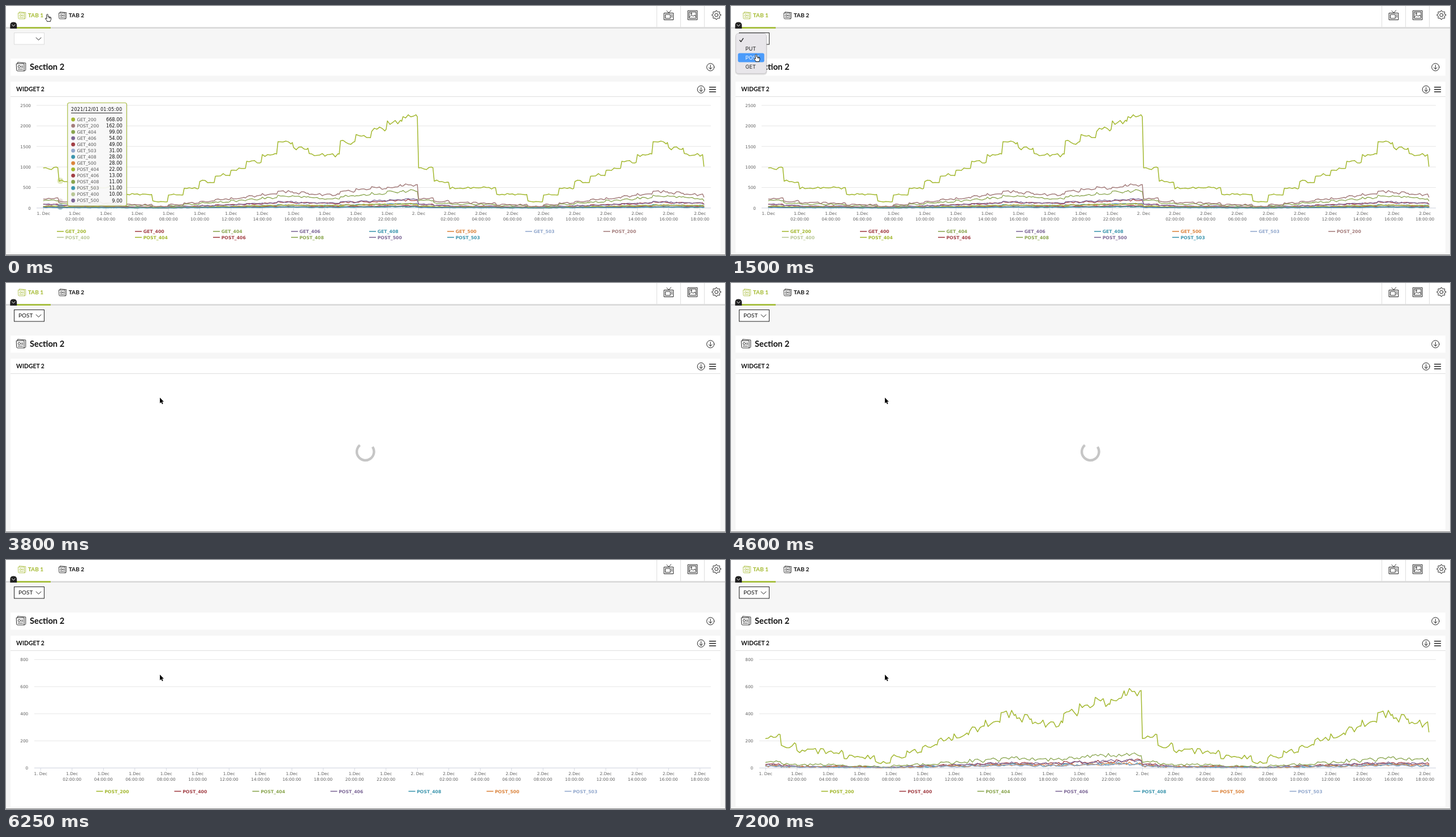
Recreate the animation shown at these times as an HTML page. Size 1271 by 441 pixels, loop 7.3 s.

```html
<!DOCTYPE html>
<html lang="en">
<head>
<meta charset="utf-8">
<title>Dashboard filter</title>
<style>
html, body { margin: 0; width: 100%; height: 100%; overflow: hidden; background: #f6f6f6; }
svg { display: block; width: 1271px; height: 441px; }
text { font-family: Lato, "Open Sans", sans-serif; fill: #111; }
.b { font-weight: 700; }
.axis { font: 7.35px "DejaVu Sans", sans-serif; fill: #606060; }
.key { font: bold 7.75px "DejaVu Sans", sans-serif; }
.tip { font: 7.7px "DejaVu Sans", sans-serif; fill: #555; }
.val { font: 8.2px "DejaVu Sans", sans-serif; fill: #111; }
.item { font: 9.2px Inter, sans-serif; }
.ln { fill: none; stroke: #222; stroke-width: 1; stroke-linecap: round; stroke-linejoin: round; }
</style>
</head>
<body>
<svg id="stage" viewBox="0 0 1271 441"></svg>
<script>
const LOOP = 7300, STEP = 50;
const LIME = '#a3b82f', RED = '#a23f45', OLIVE = '#89a54e', PLUM = '#7d6897',
  TEAL = '#3d96ae', ORANGE = '#db843d', BLUE = '#92a8cd', MAUVE = '#a47d7c', SAGE = '#b9c796';
const stage = document.getElementById('stage');

function el(name, attrs, parent = stage, text) {
  const node = document.createElementNS('http://www.w3.org/2000/svg', name);
  for (const k in attrs) node.setAttribute(k, attrs[k]);
  if (text !== undefined) node.textContent = text;
  parent.appendChild(node);
  return node;
}
const group = (parent = stage, attrs = {}) => el('g', attrs, parent);
const rect = (x, y, width, height, fill, parent, more) =>
  el('rect', { x, y, width, height, fill, ...more }, parent);
const path = (d, parent, more) => el('path', { d, class: 'ln', ...more }, parent);
const label = (x, y, text, parent, more) => el('text', { x, y, ...more }, parent, text);
const dot = (cx, cy, r, fill, parent, more) => el('circle', { cx, cy, r, fill, ...more }, parent);
const show = (node, on) => node.setAttribute('display', on ? 'inline' : 'none');
const ramp = (t, a, b) => Math.min(1, Math.max(0, (t - a) / (b - a)));

// ---- page frame ----
function cardIcon(x, y, scale, color) {
  const g = group(stage, { transform: `translate(${x} ${y}) scale(${scale})` });
  const st = { style: `stroke:${color};stroke-width:.95` };
  path('M.6 3.2H14V16H2.4Q.6 16 .6 14.2Z', g, st);
  path('M2.6 3V.7L16.8 2V14.2Q16.6 16 14 16', g, st);
  path('M9.2 7.3H11.8M9.2 9.6H11.8M3.2 12.9H11.5', g, st);
  el('circle', { cx: 5.4, cy: 8.3, r: 2.1, class: 'ln', ...st }, g);
}
function downIcon(x, y, r) {
  el('circle', { cx: x, cy: y, r, class: 'ln' });
  path(`M${x} ${y - 3.6}V${y + 3.4}M${x - 2.9} ${y + .7}L${x} ${y + 3.6}L${x + 2.9} ${y + .7}`);
}
function gearIcon(cx, cy) {
  let d = '';
  for (let i = 0; i < 32; i++) {
    const r = i % 4 < 2 ? 7.9 : 6, a = (i - .5) * Math.PI / 16;
    d += `${i ? 'L' : 'M'}${(cx + r * Math.cos(a)).toFixed(2)} ${(cy + r * Math.sin(a)).toFixed(2)}`;
  }
  path(d + 'Z');
  el('circle', { cx, cy, r: 2.9, class: 'ln' });
}

rect(0, 0, 1271, 441, '#f6f6f6');
rect(0, 0, 1271, 38, '#fff');
rect(0, 37.3, 1271, 2.6, '#d8d8d8');
rect(13, 37.3, 66, 2.6, '#a2bd30');
[1150, 1192, 1234].forEach(x => rect(x, 0, 1, 37.3, '#dedede'));
cardIcon(21.3, 10, .8, LIME);
label(38.7, 20, 'TAB 1', stage, { class: 'b', 'font-size': 10.2, style: 'fill:#a3b92c' });
cardIcon(93.3, 10, .8, '#111');
label(110.7, 20, 'TAB 2', stage, { class: 'b', 'font-size': 10.2 });
path('M7.3 40V34Q7.5 28.6 13.2 28.6T19.2 34V40Z', stage, { style: 'fill:#222;stroke:none' });
path('M10.4 33L13.2 35.7L16 33', stage, { style: 'stroke:#fff' });

path('M1163.5 12.5H1179.7V24.5H1163.5ZM1166 15H1174.3V22H1166ZM1168 8.5L1171.6 12.2L1175.4 7.8');
dot(1177, 16, .9, '#222');
dot(1177, 19, .9, '#222');
path('M1205.7 8.2H1222V24.3H1205.7ZM1208 10.5H1219.8V21.8H1208ZM1208 19.6L1212 15.8L1214.6 18.2L1217 16.2L1219.8 18.6');
el('circle', { cx: 1211.2, cy: 13.3, r: 1.2, class: 'ln' });
gearIcon(1255.8, 16);

rect(8, 93, 1255, 30.5, '#fff');
cardIcon(18, 99, 1, '#222');
label(42, 113.3, 'Section 2', stage, { class: 'b', 'font-size': 14.7 });
downIcon(1245.3, 108.3, 6.6);
rect(8, 134, 1255, 303, '#fff');
rect(8, 160, 1255, 1, '#dedede');
label(18, 150.5, 'WIDGET 2', stage, { class: 'b', 'font-size': 10.4 });
downIcon(1228.7, 147.8, 6.5);
path('M1243.5 143.7H1254.5M1243.5 147.8H1254.5M1243.5 151.9H1254.5', stage, { style: 'stroke-width:1.5' });
rect(0, 440, 1271, 1, '#8c8c8c');

const box = rect(14.5, 47.5, 53, 20.5, '#fff');
const picked = label(22, 61.3, 'POST', stage, { 'font-size': 10 });
path('M53.2 56L57.6 60.4L62 56');

// ---- charts ----
const HOURS = [960, 650, 490, 490, 490, 330, 325, 160, 325, 490, 650, 810, 950, 1120, 1290,
  1600, 1450, 1290, 1275, 1600, 1760, 1920, 2090, 2230];
const LAST = 507;
const hash = (seed, i) => {
  const v = Math.sin(seed * 127.1 + i * 311.7) * 43758.5453;
  return 2 * (v - Math.floor(v)) - 1;
};
// Load per five minutes; both days follow the same pattern.
function load(seed, share, k) {
  const m = k % 288, v = HOURS[Math.floor(m / 12)] * share;
  const n = m % 2 ? (hash(seed, m - 1) + hash(seed, m + 1)) / 2 : hash(seed, m);
  return Math.max(1, v + n * (share === 1 ? 1.3 : 1.8) * Math.sqrt(v)) * (k === LAST ? .78 : 1);
}
function line(seed, share, c) {
  let d = '';
  for (let k = 0; k <= LAST; k++) {
    const x = c.x0 + k * c.gap / 24, y = c.zero - load(seed, share, k) * c.unit;
    d += `${k ? 'L' : 'M'}${x.toFixed(1)} ${y.toFixed(1)}`;
  }
  return d;
}
function chart(c) {
  const g = group();
  for (let v = 0; v <= c.max; v += c.tick) {
    const y = c.zero - v * c.unit;
    rect(c.left, y - .5, c.right - c.left, 1, v ? '#e6e6e6' : '#ccd0dc', g);
    label(c.labelX, y + 3, v, g, { class: 'axis', 'text-anchor': 'end' });
  }
  for (let i = 0; i < 22; i++) {
    const x = c.x0 + i * c.gap, day = i < 12 ? 1 : 2, h = i * 2 % 24;
    const mid = { class: 'axis', 'text-anchor': 'middle' };
    rect(x - .4, c.zero, .8, 5, '#ccd0dc', g);
    label(x, c.zero + 12.6, h ? day + '.Dec' : day + '. Dec', g, mid);
    if (h) label(x, c.zero + 22.4, String(h).padStart(2, '0') + ':00:00', g, mid);
  }
  const plot = group(g);
  c.series.forEach(([name, color, share], i) => {
    path(line(c.seed + i, share, c), plot, { style: `stroke:${color};stroke-width:${share > .24 ? 1.5 : 1.3}` });
    const x = c.keyX + i % 8 * 138, y = c.keyY + Math.floor(i / 8) * 10.4;
    rect(x, y - .8, 12, 1.6, color, g);
    label(x + 14.7, y + 2.9, name, g, { class: 'key', style: `fill:${color}` });
  });
  return { g, plot };
}

const ALL = [
  ['GET_200', LIME, 1, 668], ['GET_400', RED, .087, 49], ['GET_404', OLIVE, .185, 99],
  ['GET_406', PLUM, .092, 54], ['GET_408', TEAL, .045, 28], ['GET_500', ORANGE, .044, 28],
  ['GET_503', BLUE, .046, 31], ['POST_200', MAUVE, .254, 162], ['POST_400', SAGE, .022, 10],
  ['POST_404', LIME, .045, 22], ['POST_406', RED, .023, 13], ['POST_408', OLIVE, .016, 11],
  ['POST_500', PLUM, .016, 9], ['POST_503', TEAL, .014, 11]
];
const POSTS = [
  ['POST_200', LIME, .254], ['POST_400', RED, .024], ['POST_404', OLIVE, .047],
  ['POST_406', PLUM, .024], ['POST_408', TEAL, .014], ['POST_500', ORANGE, .015], ['POST_503', BLUE, .013]
];
const full = chart({ left: 54, right: 1246, labelX: 44, x0: 66.3, gap: 55.26, zero: 357.8, unit: .07272,
  max: 2500, tick: 500, keyX: 90, keyY: 399.3, seed: 3, series: ALL });
const posts = chart({ left: 50, right: 1246, labelX: 39.3, x0: 61.3, gap: 55.5, zero: 368.3, unit: .24,
  max: 800, tick: 200, keyX: 159.5, keyY: 409.6, seed: 10, series: POSTS });
const clip = el('clipPath', { id: 'sweep' });
const sweep = rect(50, 165, 0, 210, '#000', clip);
posts.plot.setAttribute('clip-path', 'url(#sweep)');

// ---- hover tooltip ----
const tip = group();
dot(96, 309.5, 5.5, LIME, tip, { 'fill-opacity': .3 });
dot(96, 346, 5, MAUVE, tip, { 'fill-opacity': .25 });
dot(96, 355.5, 5.5, TEAL, tip, { 'fill-opacity': .4 });
dot(96, 355.5, 4, '#7b7f88', tip, { 'fill-opacity': .5 });
rect(109.5, 172.5, 105, 183, '#000', tip, { rx: 3, 'fill-opacity': .1 });
rect(108.8, 171.5, 104.5, 182.5, '#fafafa', tip, { rx: 3, 'fill-opacity': .92, stroke: '#a9bd45', 'stroke-width': 1.2 });
label(115, 186, '2021/12/01 01:05:00', tip, { class: 'val', style: 'font-size:8px;letter-spacing:.3px' });
rect(115, 189, 90.5, 1, '#222', tip);
const byValue = [...ALL].sort((a, b) => b[3] - a[3]);
byValue.forEach(([name, color, , value], i) => {
  const y = 201 + i * 11.04;
  dot(118.7, y, 3.4, color, tip);
  label(125.5, y + 2.7, name, tip, { class: 'tip' });
  label(205.6, y + 3, value.toFixed(2), tip, { class: 'val', 'text-anchor': 'end' });
});

// ---- spinner, menu, pointers ----
const spinner = el('circle', { r: 15.2, fill: 'none', stroke: '#c6c6c6', 'stroke-width': 4.4,
  pathLength: 360, 'stroke-dasharray': '264 96' });

const menu = group();
rect(7, 50, 57, 73, '#000', menu, { rx: 6, 'fill-opacity': .05 });
rect(8, 49, 55.5, 72.5, '#000', menu, { rx: 5, 'fill-opacity': .1 });
rect(8.5, 48.5, 54, 71, '#e8e6ea', menu, { rx: 4.5, stroke: '#c9c7cb', 'stroke-width': .8 });
const mark = rect(12.3, 52, 46.5, 15.8, '#4b9bfa', menu, { rx: 3 });
const rows = [path('M15.5 60.8L17.6 63.3L21.6 57.4', menu, { style: 'stroke-width:1.4' })];
['PUT', 'POST', 'GET'].forEach((s, i) => rows.push(label(25.6, 79.4 + i * 15.8, s, menu, { class: 'item' })));

const hand = path('M-1.2 1Q0-.9 1.2 1V4.6Q2.3 3.9 3 5Q4.2 4.3 4.8 5.5Q6.2 5 6.6 6.5V9Q6.4 11 5.6 11.6V13H-.6V12' +
  'Q-2 10.5-3.6 7.8Q-3.2 6.4-1.2 8ZM3 5V7M4.8 5.5V7.3', stage, { style: 'fill:#fff;stroke:#111;stroke-width:.95' });
const arrow = path('M0 0V10L2.3 7.9L3.9 11.6L5.6 10.9L4 7.3H7Z', stage,
  { style: 'fill:#000;stroke:#fff;stroke-width:.8;paint-order:stroke' });

// time, x, y of the pointer tip
const ROUTE = [
  [0, 73, 14.3], [150, 66, 24], [350, 48, 48], [500, 43, 54], [850, 43, 54], [950, 43, 63],
  [1100, 43, 70.5], [1350, 43, 70.5], [1500, 44.3, 85.5], [2400, 44.3, 85.5], [2550, 53, 85.3],
  [2600, 81, 83.5], [2650, 125, 93], [2700, 171, 118], [2750, 207, 146], [2850, 250, 183], [3000, 272, 203]
];
function place(t) {
  const i = ROUTE.findIndex(p => p[0] > t);
  if (i < 0) return ROUTE[ROUTE.length - 1].slice(1);
  const [a, b] = [ROUTE[i - 1], ROUTE[i]], f = ramp(t, a[0], b[0]);
  return [a[1] + (b[1] - a[1]) * f, a[2] + (b[2] - a[2]) * f];
}

function draw(t) {
  tip.setAttribute('opacity', 1 - ramp(t, 150, 400));
  box.setAttribute('stroke', t < 600 ? '#dcdcdc' : '#222');
  show(picked, t >= 1900);

  show(menu, t >= 600 && t < 2050);
  menu.setAttribute('opacity', 1 - ramp(t, 1850, 2050));
  const row = t < 900 ? 0 : t < 1400 ? 1 : 2, lit = t < 1750;
  show(mark, lit);
  mark.setAttribute('y', 52 + row * 15.8);
  rows.forEach((r, i) => {
    r.style[i ? 'fill' : 'stroke'] = lit && i === row ? '#fff' : '#222';
  });

  show(full.g, t < 2000);
  show(spinner, t >= 2000 && t < 6250);
  spinner.setAttribute('transform', `translate(635.3 298.8) rotate(${56 + t * .45})`);
  show(posts.g, t >= 6250);
  sweep.setAttribute('width', 1196 * (1 - Math.cos(Math.PI * ramp(t, 6243, 7243))) / 2);

  const [x, y] = place(t);
  show(hand, t < 1950);
  show(arrow, t >= 1950);
  for (const p of [hand, arrow]) p.setAttribute('transform', `translate(${x} ${y})`);
}

const start = performance.now();
function tick() {
  const t = (performance.now() - start) % LOOP;
  draw(Math.floor(t / STEP) * STEP);
  requestAnimationFrame(tick);
}
tick();
</script>
</body>
</html>
```
